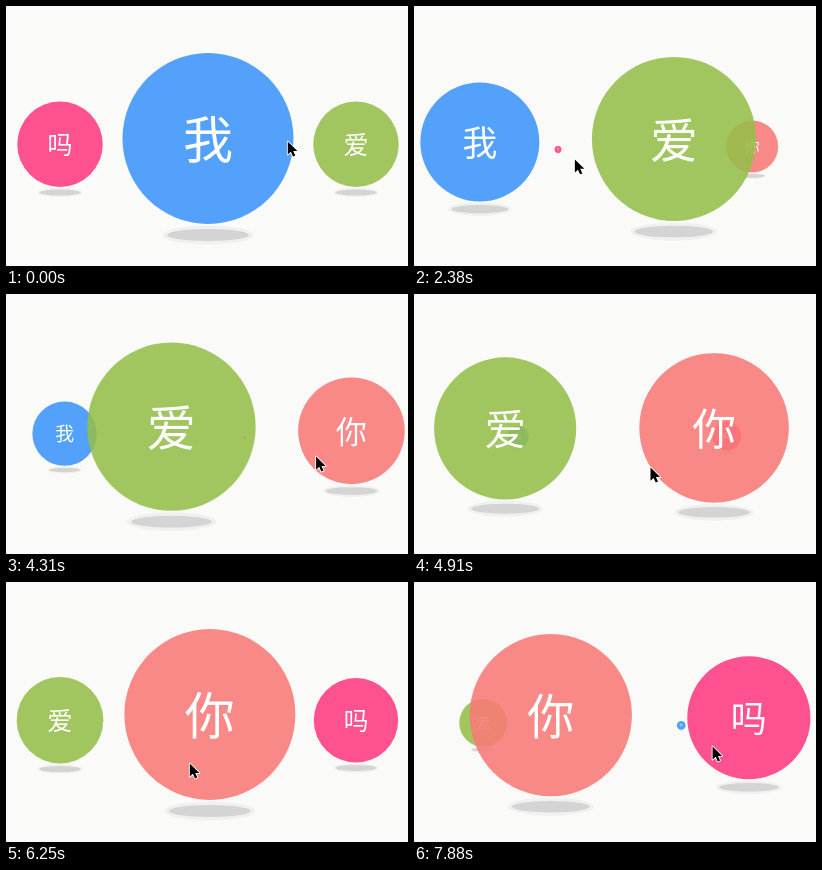
Write an HTML page that moves like this. It is 402 px wide and 260 px high and loops after 8000 ms.

```html
<!DOCTYPE html>
<html lang="zh-CN">
<head>
<meta charset="utf-8">
<title>Ball carousel</title>
<style>
  html, body { margin: 0; width: 100%; height: 100%; overflow: hidden; background: #fafaf8; }
  svg { display: block; width: 100%; height: 100%; }
  text { font: 400 50px "Noto Sans CJK SC", "Noto Sans CJK", sans-serif; fill: #fff; text-anchor: middle; }
</style>
</head>
<body>
<svg viewBox="0 0 402 260">
  <g id="balls"></g>
  <g id="pointer">
    <path d="M0 0V15L3.6 11.8L6 17.2L8.6 16.1L6.2 10.8H11Z" transform="translate(.8 1.5) scale(.87)" stroke="#fff" stroke-width="2" stroke-linejoin="round" paint-order="stroke"/>
  </g>
</svg>
<script>
const LOOP = 8000, STEP = 148.7;
const DEG_PER_PX = 0.465, SNAP_STEPS = 6;

const layer = document.getElementById('balls');
const pointer = document.getElementById('pointer');

function make(tag, attrs, parent) {
  const el = document.createElementNS('http://www.w3.org/2000/svg', tag);
  for (const name in attrs) el.setAttribute(name, attrs[name]);
  return parent.appendChild(el);
}

const balls = [
  ['我', 'rgb(59,149,251)'],
  ['爱', 'rgb(149,191,73)'],
  ['你', 'rgb(250,121,119)'],
  ['吗', 'rgb(255,57,128)']
].map(([word, fill], i) => {
  const el = make('g', {}, layer);
  make('ellipse', { cy: 96.5, rx: 45.5, ry: 9.5, fill: 'rgba(0,0,0,.04)' }, el);
  make('ellipse', { cy: 96.5, rx: 41, ry: 6, fill: '#d4d4d4' }, el);
  make('circle', { r: 85.5, fill, 'fill-opacity': 0.87 }, el);
  make('text', { y: 19.6 }, el).textContent = word;
  return { el, home: i * 90 };
});

// Pointer moves, timed in steps; a drag also turns the ring until its release.
const origin = { x: 281, y: 134 };
const moves = [
  { start: 0, end: 4, x: 220, y: 145 },
  { start: 5, end: 10, x: 304, y: 134 },
  { start: 10.6, end: 19, x: 139, y: 154.5, release: 20 },
  { start: 20, end: 26, x: 340, y: 156.5 },
  { start: 27.7, end: 40.3, x: 183, y: 180, release: 38 },
  { start: 45, end: 50, x: 354, y: 158 },
  { start: 50.5, end: 60, x: 231, y: 169, release: 60 }
];
const drags = moves.filter(m => m.release);

const clamp = v => Math.min(1, Math.max(0, v));
const easeOut = (p, power) => 1 - (1 - clamp(p)) ** power;

function pointerAt(k) {
  let { x, y } = origin;
  for (const m of moves) {
    const e = easeOut((k - m.start) / (m.end - m.start), 2);
    x += (m.x - x) * e;
    y += (m.y - y) * e;
  }
  return { x, y };
}

// Every drag ends with the ring snapping to the next quarter turn.
function turnAt(k) {
  return drags.reduce((turn, d) => {
    const held = Math.max(d.start, Math.min(k, d.release));
    const pull = (pointerAt(held).x - pointerAt(d.start).x) * DEG_PER_PX;
    return turn + pull - (90 + pull) * easeOut((k - d.release) / SNAP_STEPS, 3);
  }, 0);
}

function render(time) {
  const k = Math.floor((time % LOOP + 5) / STEP);
  const turn = turnAt(k);
  for (const ball of balls) {
    const a = (ball.home + turn) * Math.PI / 180;
    ball.size = (1 + Math.cos(a)) / 2;
    const x = 202 + 148 * Math.sin(a), y = 144 - 11.5 * ball.size;
    ball.el.setAttribute('transform', `translate(${x} ${y}) scale(${ball.size})`);
  }
  [...balls].sort((a, b) => a.size - b.size).forEach(b => layer.appendChild(b.el));
  const { x, y } = pointerAt(k);
  pointer.setAttribute('transform', `translate(${x} ${y})`);
}

const begin = performance.now();
function tick() {
  render(performance.now() - begin);
  requestAnimationFrame(tick);
}
tick();
</script>
</body>
</html>
```
